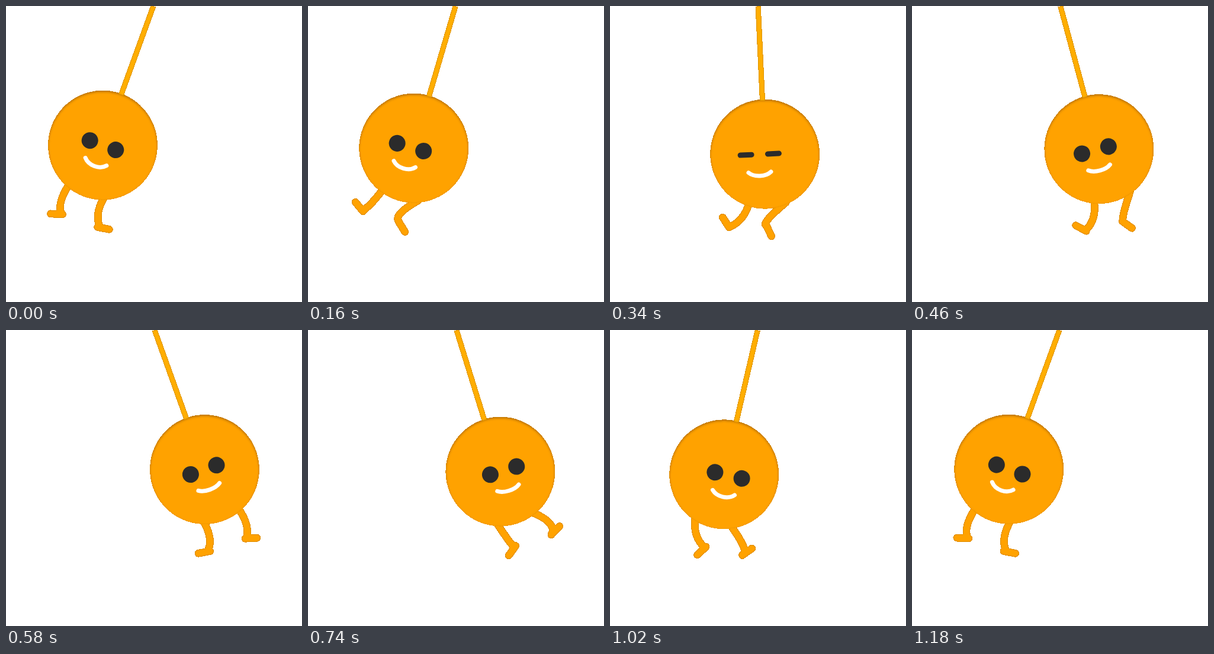
These frames come from a looping animation (500x500 px, 1.2 s). An HTML page:

```html
<!DOCTYPE html>
<html lang="en">
<head>
<meta charset="utf-8">
<title>Swinging ball</title>
<style>
  html, body { margin: 0; width: 100%; height: 100%; overflow: hidden; background: #fff; }
  svg { display: block; width: 100vw; height: 100vh; }
  .line { fill: none; stroke-linecap: round; stroke-linejoin: round; }
  .leg { stroke: #ffa200; stroke-width: 12.8; }
  .mouth { stroke: #fff; stroke-width: 7; }
  .body { shape-rendering: crispEdges; }
</style>
</head>
<body>
<svg viewBox="0 0 500 500">
  <defs>
    <filter id="thin" filterUnits="userSpaceOnUse" x="-40" y="-40" width="580" height="580" color-interpolation-filters="sRGB">
      <feFlood flood-color="#7a4600" flood-opacity=".62"/>
      <feComposite in2="SourceAlpha" operator="out"/>
      <feGaussianBlur stdDeviation="1.3"/>
      <feComposite in2="SourceAlpha" operator="in"/>
      <feComposite in2="SourceGraphic" operator="over"/>
    </filter>
    <filter id="rim" filterUnits="userSpaceOnUse" x="-40" y="-40" width="580" height="580" color-interpolation-filters="sRGB">
      <feFlood flood-color="#7a4600" flood-opacity=".58"/>
      <feComposite in2="SourceAlpha" operator="out"/>
      <feGaussianBlur stdDeviation="2"/>
      <feOffset dy="1.5"/>
      <feComposite in2="SourceAlpha" operator="in"/>
      <feComposite in2="SourceGraphic" operator="over"/>
    </filter>
  </defs>
  <g class="body" filter="url(#thin)">
    <g class="swing">
      <path class="line leg"/>
      <path class="line leg"/>
    </g>
  </g>
  <g class="body" filter="url(#rim)">
    <g class="swing"><circle r="92.5" fill="#ffa200"/></g>
  </g>
  <g class="body" filter="url(#thin)">
    <g class="swing"><rect x="-4.6" y="-250" width="9.2" height="159.5" fill="#ffae00"/></g>
  </g>
  <g class="swing">
    <g id="face">
      <rect class="eye" x="-37.2" width="28" fill="#2b2b2b"/>
      <rect class="eye" x="9.2" width="28" fill="#2b2b2b"/>
      <path class="line mouth"/>
    </g>
  </g>
</svg>
<script>
const LOOP = 1200, STEP = 20, START = 20, TURN = 620;
const ROPE = 253, PIVOT = [250, -2.6], HIP_Y = 83, FOOT = 20;

// dir: where the toe points; swing, arc, lift: how the knee bends with the kick
const LEGS = [
  { x: -31, dir: -1, swing: 3, arc: 0, drop: 5, lift: 0 },
  { x: 32, dir: 1, swing: -11, arc: -4, drop: 4, lift: 4 }
];

const all = s => [...document.querySelectorAll(s)];
const swings = all('.swing'), legs = all('.leg'), eyes = all('.eye');
const face = document.getElementById('face'), mouth = document.querySelector('.mouth');
const clamp = v => Math.min(1, Math.max(0, v));

// cubic-bezier(.5, 0, .5, 1)
function ease(u) {
  let s = u;
  for (let i = 0; i < 6; i++) s -= (1.5 * s * (1 - s) + s ** 3 - u) / (1.5 - 3 * s + 3 * s * s);
  return s * s * (3 - 2 * s);
}

// kick is the sideways throw of the legs, lag their drift across one swing
function legPath(leg, kick, lag) {
  const heelX = leg.x + 7 * lag - 35 * kick;
  const heelY = HIP_Y + 50 - 13 * kick * kick;
  const turn = (63 * kick - 13 * lag + 4 * leg.dir) * Math.PI / 180;
  const footX = leg.dir * FOOT * Math.cos(turn);
  const footY = leg.dir * FOOT * Math.sin(turn);
  const grip = .15 * (1 - kick);
  const ankleX = heelX + footX * grip, ankleY = heelY + footY * grip - 2 * (1 - kick);
  const bendX = leg.swing * kick + leg.arc * kick * kick - 5 * lag;
  const bendY = leg.drop + leg.lift * kick;
  const kneeX = (leg.x + ankleX) / 2 + 2 * bendX;
  const kneeY = (HIP_Y + ankleY) / 2 + 2 * bendY;
  return `M${leg.x} ${HIP_Y}Q${kneeX} ${kneeY} ${ankleX} ${ankleY}L${heelX} ${heelY}l${footX} ${footY}`;
}

function draw(t) {
  const out = t < TURN;
  const side = out ? 1 : -1;
  const u = out ? clamp((t - START) / (TURN - START)) : (t - TURN) / (LOOP - TURN);
  const sway = side * (1 - 2 * ease(u));
  const pose = `translate(${PIVOT}) rotate(${20 * sway}) translate(0 ${ROPE})`;
  swings.forEach(g => g.setAttribute('transform', pose));

  // The legs settle shortly before the swing ends
  const v = clamp(u / .933);
  const kick = side * Math.sin(Math.PI * v), lag = side * (1 - 2 * v);
  legs.forEach((path, i) => path.setAttribute('d', legPath(LEGS[i], kick, lag)));

  face.setAttribute('transform', `translate(${-9 * side * Math.sin(Math.PI * u)} 0)`);
  const shut = clamp(Math.min(t - 240, 440 - t) / 80);
  const h = 28 - 19 * shut;
  eyes.forEach(e => {
    e.setAttribute('y', -h / 2);
    e.setAttribute('height', h);
    e.setAttribute('rx', h / 2);
  });
  const dip = 30.2 + (6.4 + 1.5 * sway) * 4 / 3;
  mouth.setAttribute('d', `M-20.2 30.2C-11 ${dip} 8.6 ${dip} 17.8 30.2`);
}

const start = performance.now();
function tick() {
  const t = (performance.now() - start) % LOOP;
  draw(Math.floor(t / STEP) * STEP);
  requestAnimationFrame(tick);
}
tick();
</script>
</body>
</html>
```
